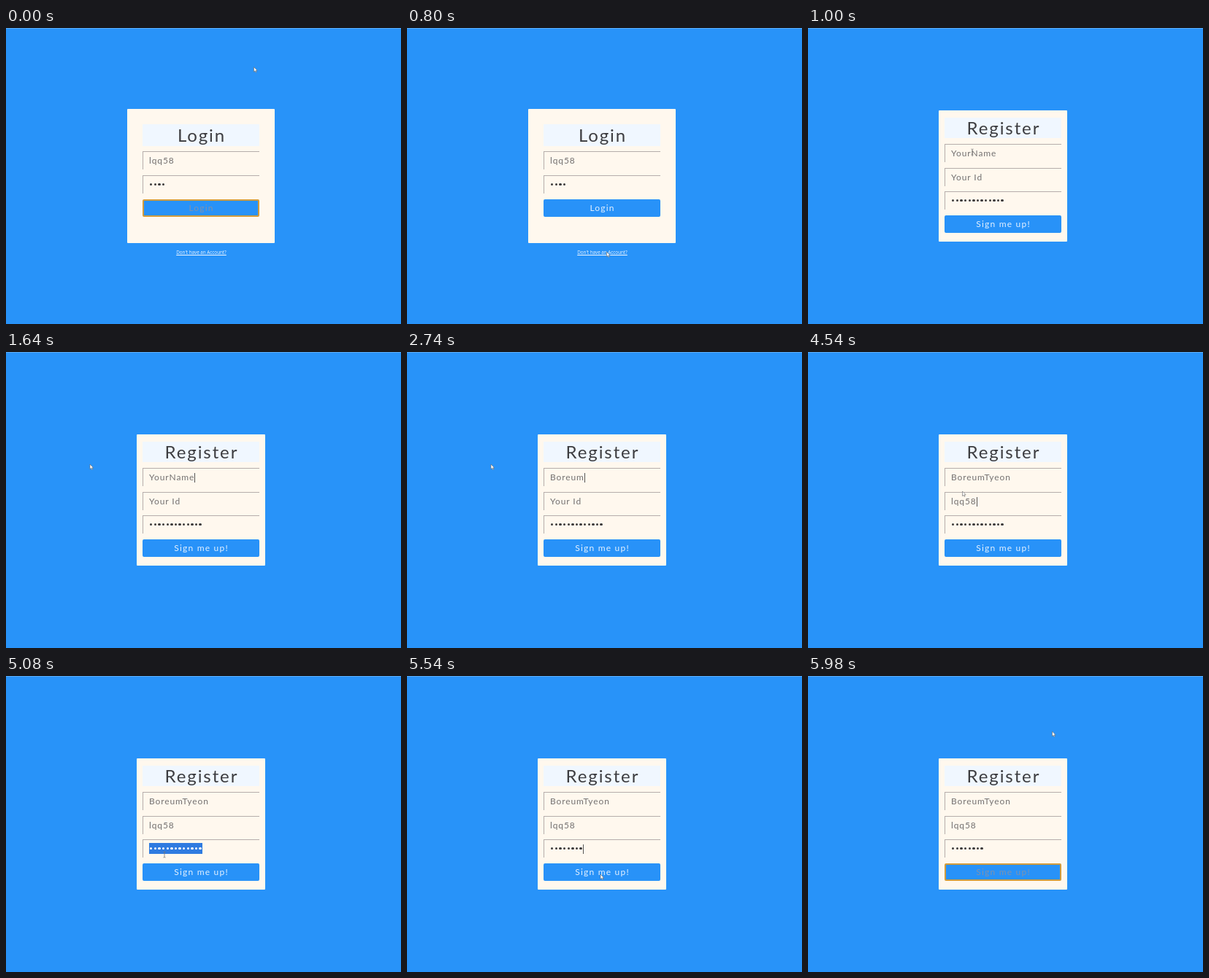
Recreate the animation shown at these times as an HTML page. Size 541 by 406 pixels, loop 6 s.

```html
<!DOCTYPE html>
<html lang="en">
<head>
<meta charset="utf-8">
<title>Login and register</title>
<style>
  html, body { margin: 0; width: 100%; height: 100%; overflow: hidden; }
  body { position: relative; background: #2893f9; font: 12px Lato, sans-serif; }
  body::before { content: ""; position: absolute; inset: 0 0 auto; height: 1px; background: #5cacf5; }
  div, svg { position: absolute; box-sizing: border-box; }
  .form { inset: 0; white-space: pre; }
  .card { background: #fff8ee; border-radius: 1px; }
  #login .card { left: 166px; top: 111px; width: 202px; height: 184px; }
  #register .card { left: 179px; top: 113px; width: 176px; height: 180px; }
  .title, .field, .button { left: 187px; width: 160px; }
  .title {
    background: #f0f7ff; color: #3d3d40; text-align: center;
    font-size: 24px; letter-spacing: 1.9px; text-indent: 1.9px;
  }
  #login .title { top: 132px; height: 30px; line-height: 30px; }
  #register .title { top: 123px; height: 28px; line-height: 28px; }
  .field {
    height: 25px; padding-left: 8px; line-height: 24px; color: #737070; letter-spacing: .9px;
    border: solid #b5adab; border-width: 1px 0 0 1px;
  }
  .field i {
    display: inline-block; position: relative; top: -3px; margin: 0 1.17px;
    width: 3.3px; height: 3.3px; border-radius: 50%; background: #3c3a3a;
  }
  .field mark { background: #2f7be0; color: #fff; }
  .field mark i { background: #fff; }
  .field b { display: inline-block; width: 1px; height: 13px; margin-right: -1px; vertical-align: -3px; background: #555; }
  .button {
    height: 24px; line-height: 20px; text-align: center; letter-spacing: 1.2px; text-indent: 1.2px;
    background: #2892f8; border: 2px solid #2892f8; border-radius: 2px; color: #e4f1ff;
  }
  .button.focus { border-color: #d29c3c; color: #7f92ad; }
  .link {
    top: 303px; left: 0; width: 535px; text-align: center; line-height: 10px;
    font-family: "Open Sans", sans-serif; font-size: 6.3px; color: #f2f8ff; text-decoration: underline;
  }
  #cursor { left: 0; top: 0; width: 10px; height: 12px; overflow: visible; }
</style>
</head>
<body>
<div class="form" id="login">
  <div class="card"></div>
  <div class="title">Login</div>
  <div class="field" style="top:169px">lqq58</div>
  <div class="field" style="top:202px"><i></i><i></i><i></i><i></i></div>
  <div class="button" id="loginButton" style="top:235px">Login</div>
  <div class="link">Don't have an Account?</div>
</div>
<div class="form" id="register">
  <div class="card"></div>
  <div class="title">Register</div>
  <div class="field" id="name" style="top:159px"></div>
  <div class="field" id="userId" style="top:192px"></div>
  <div class="field" id="password" style="top:224px"></div>
  <div class="button" id="signButton" style="top:257px">Sign me up!</div>
</div>
<svg id="cursor">
  <path id="arrow" d="M0 0V6.6L1.6 5.2L2.6 7.4L3.6 6.9L2.7 4.8H4.6Z" fill="#fff" stroke="#666" stroke-width=".6"/>
  <path id="beam" d="M-1.5-4Q0-4 0-3V3Q0 4-1.5 4M1.5-4Q0-4 0-3M0 3Q0 4 1.5 4" fill="none" stroke="#777" stroke-width=".8"/>
</svg>
<script>
  const LOOP = 6000, FIRST = 'Boreum', LAST = 'Tyeon', ID = 'lqq58';
  const $ = id => document.getElementById(id);

  // Pointer stops: time, x, y
  const path = [
    [0, 339.5, 53.5], [20, 339.5, 53.5], [140, 344, 42], [240, 344, 42],
    [620, 288, 296], [720, 273.5, 307], [860, 273.5, 307],
    [1000, 225, 170], [1040, 225, 170], [1160, 108, 156], [1220, 115, 154], [3240, 115, 154],
    [3480, 298, 205], [3540, 298, 205], [3760, 211.5, 191], [4540, 211.5, 191],
    [4640, 354, 256], [4720, 328, 240], [4760, 328, 240], [4940, 156, 240],
    [5080, 217, 245], [5340, 217, 245], [5480, 265, 272], [5620, 265, 272],
    [5960, 322.5, 88.5], [5980, 334.5, 76], [6000, 334.5, 76]
  ];

  function pointer(t) {
    const n = path.findIndex(p => p[0] > t);
    const [t0, x0, y0] = path[n - 1], [t1, x1, y1] = path[n];
    let k = (t - t0) / (t1 - t0);
    if (t1 - t0 > 20) k = k * k * (3 - 2 * k);
    return [x0 + (x1 - x0) * k, y0 + (y1 - y0) * k];
  }

  const keys = (t, start, step) => Math.max(0, Math.floor((t - start) / step) + 1);
  const typed = (text, t, start, step) => text.slice(0, keys(t, start, step));

  function nameAt(t) {
    if (t >= 2900) return FIRST + typed(LAST, t, 2900, 40);
    if (t >= 2720) return FIRST;
    if (t >= 2400) return typed(FIRST.slice(0, 5), t, 2400, 60);
    if (t >= 1740 && t < 1860) return 'YourName' + FIRST[0];
    return 'YourName'.slice(0, Math.max(0, 8 - keys(t, 2080, 35)));
  }

  // Dragging left selects from the pointer to the end of the text
  function selectFrom(x, length, pitch) {
    return Math.max(0, Math.min(length, Math.round((x - 196) / pitch)));
  }

  const dots = text => text.replace(/\*/g, '<i></i>');

  function fill(id, text, from, caret) {
    const selected = text.slice(from);
    $(id).innerHTML = dots(text.slice(0, from)) +
      (selected ? `<mark>${dots(selected)}</mark>` : '') + (caret ? '<b></b>' : '');
  }

  function drawRegister(t, x, y) {
    const name = nameAt(t);
    fill('name', name, name.length, t >= 1020 && t < 3500 && !(t >= 1400 && t < 1640));

    const id = t < 4100 ? 'Your Id' : typed(ID, t, 4100, 90);
    const dragId = t >= 3540 && t < 4100;
    fill('userId', id, dragId ? (y < 192 ? 0 : selectFrom(x, id.length, 6)) : id.length, t >= 4100 && t < 4740);

    const pass = '*'.repeat(t < 5160 ? 13 : Math.min(8, keys(t, 5160, 22)));
    const dragPass = t >= 4760 && t < 5160;
    const edge = t < 4940 ? x : 0;
    fill('password', pass, dragPass ? selectFrom(edge, 13, 5.65) : pass.length, t >= 5160 && t < 5560);

    $('signButton').classList.toggle('focus', t >= 5560);
  }

  function frame() {
    const t = Math.floor(performance.now() % LOOP / 20) * 20;
    const [x, y] = pointer(t);
    const registering = t >= 880;
    $('login').style.display = registering ? 'none' : '';
    $('register').style.display = registering ? '' : 'none';
    $('loginButton').classList.toggle('focus', t < 200);
    if (registering) drawRegister(t, x, y);

    const rows = registering ? [159, 192, 224] : [169, 202];
    const overField = x > 187 && x < 347 && rows.some(top => y > top && y < top + 25);
    $('arrow').style.display = overField ? 'none' : '';
    $('beam').style.display = overField ? '' : 'none';
    $('cursor').style.transform = `translate(${x}px, ${y}px)`;
    requestAnimationFrame(frame);
  }
  frame();
</script>
</body>
</html>
```
